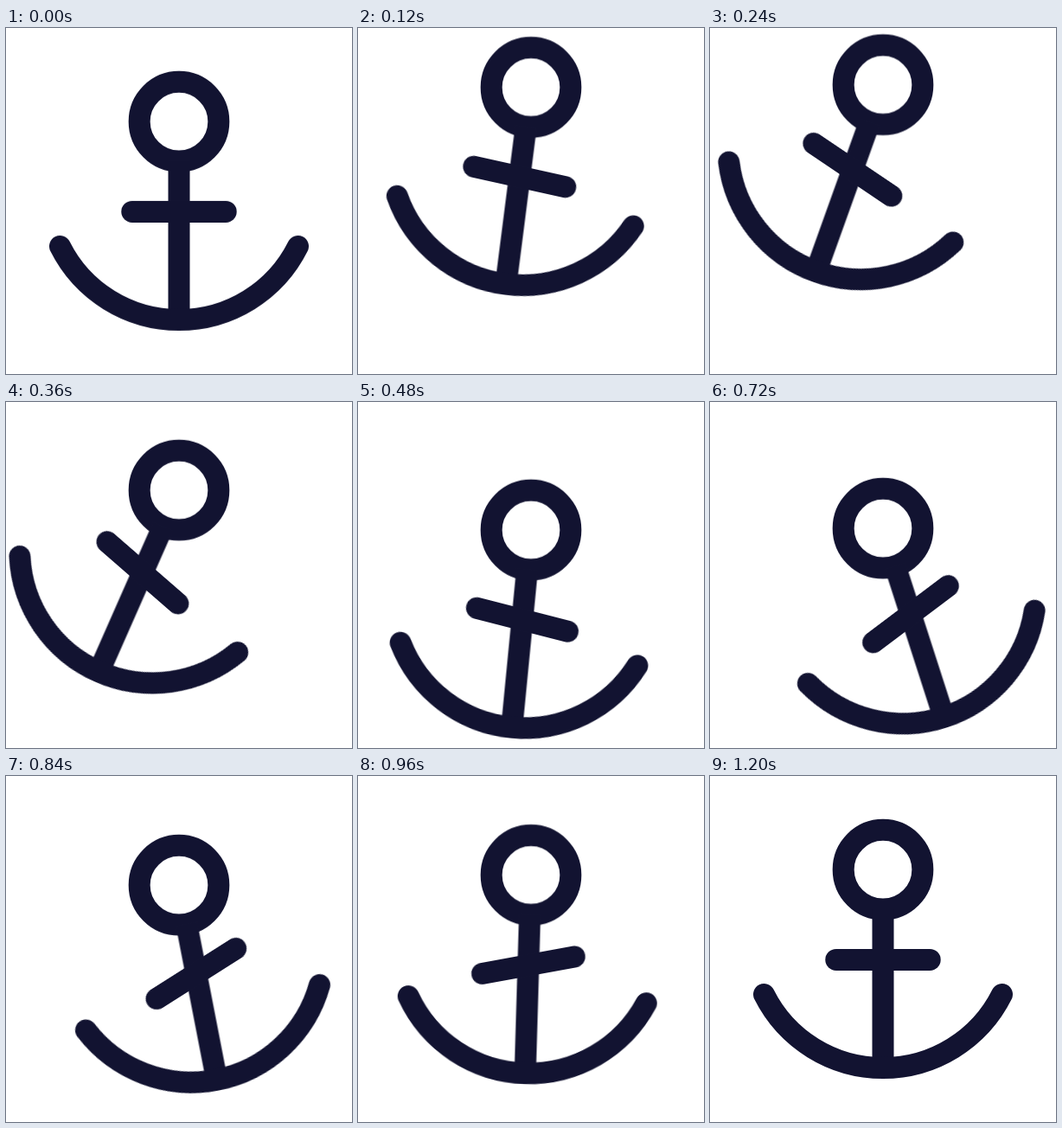
An HTML page without scripts that plays this animation: 400 px wide and 400 px high, repeating every 1770 ms.

```html
<!DOCTYPE html>
<html lang="en">
<head>
<meta charset="utf-8">
<title>Swinging anchor</title>
<style>
  html, body { margin: 0; width: 100%; height: 100%; overflow: hidden; background: #fff; }
  svg { display: block; width: 100%; height: 100%; fill: none; stroke: #121331; stroke-width: 25; }
  .anchor, .body, .bar { animation: 1770ms linear infinite; }
  .anchor { animation-name: heave; }
  .body { animation-name: swing; transform-origin: 200px 108.2px; }
  .bar { animation-name: tilt; transform-origin: 200px 212.4px; stroke-linecap: round; }
  .arms { stroke-linecap: round; }

  @keyframes heave {
    0% { transform: translateY(0); animation-timing-function: ease; }
    11.3% { transform: translateY(-44.6px); animation-timing-function: cubic-bezier(.45, 0, .5, 1); }
    32.2% { transform: translateY(48.4px); animation-timing-function: cubic-bezier(.36, 0, .28, 1); }
    67.8%, 100% { transform: translateY(0); }
  }
  @keyframes swing {
    0% { transform: rotate(0deg); animation-timing-function: cubic-bezier(.36, 0, .5, 1); }
    20.34% { transform: rotate(23.8deg); animation-timing-function: cubic-bezier(.32, 0, .25, 1); }
    42.37% { transform: rotate(-18deg); animation-timing-function: cubic-bezier(.39, 0, .33, 1); }
    58.47% { transform: rotate(3deg); animation-timing-function: cubic-bezier(.33, 0, .4, 1); }
    67.8%, 100% { transform: rotate(0deg); }
  }
  @keyframes tilt {
    0% { transform: rotate(0deg); animation-timing-function: cubic-bezier(.36, 0, .5, 1); }
    20.34% { transform: rotate(17.2deg); animation-timing-function: cubic-bezier(.36, 0, .35, 1); }
    47.46% { transform: rotate(-21.4deg); animation-timing-function: cubic-bezier(.36, 0, .28, 1); }
    67.8%, 100% { transform: rotate(0deg); }
  }
</style>
</head>
<body>
<svg viewBox="0 0 400 400">
  <g class="anchor">
    <circle cx="200" cy="108.2" r="45.83"/>
    <g class="body">
      <path d="M200 154V337"/>
      <path class="arms" d="M62.5 252.5A153.7 153.7 0 0 0 337.5 252.5"/>
      <path class="bar" d="M145.8 212.4H254.2"/>
    </g>
  </g>
</svg>
</body>
</html>
```
